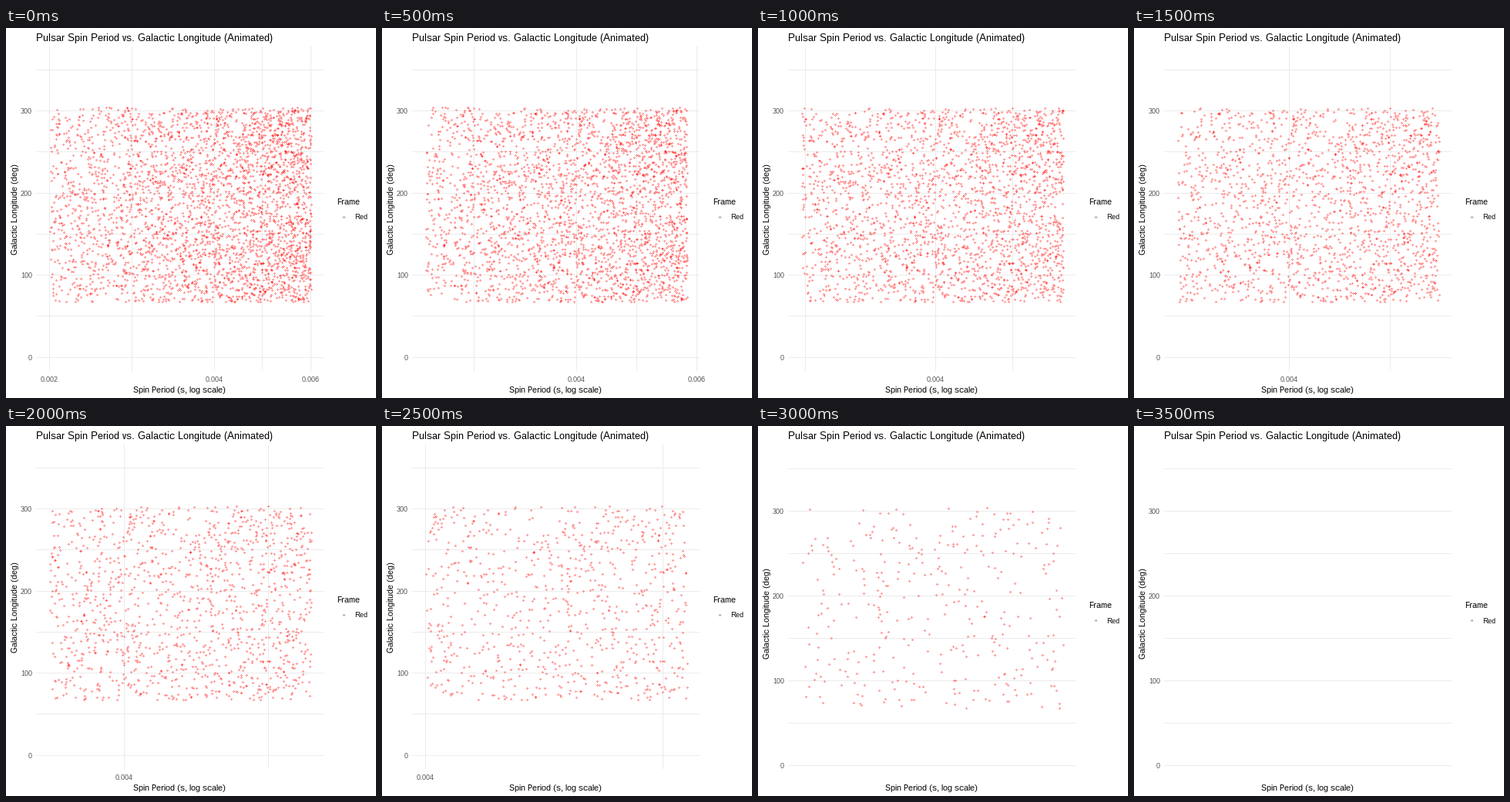
A matplotlib script that plays this animation: 480 by 480 pixels, repeating every 5000 ms.

```python
import numpy as np
import matplotlib.pyplot as plt
from matplotlib.animation import FuncAnimation

plt.rcParams.update({
    "font.family": "Liberation Sans",
    "text.hinting": "native",
    "text.hinting_factor": 1,
})

SIZE = 480
STEP_MS = 500
STEPS = 10
LEFT, RIGHT, TOP = 39, 412, 24
DATA_LEFT, DATA_RIGHT = 56.5, 395.5
GRID, TICK = "#ebebeb", "#4d4d4d"

rng = np.random.default_rng(7)
COUNT = 3400
period = rng.uniform(0.002, 0.006, COUNT)
longitude = rng.uniform(67.5, 304.5, COUNT)

fig = plt.figure(figsize=(SIZE / 72, SIZE / 72), dpi=72, facecolor="white")
ax = fig.add_axes([0, 0, 1, 1])


def label(x, y, text, size=11, color="black", **kw):
    ax.text(x, y, text, fontsize=size, color=color, **kw)


def rule(xs, ys):
    ax.plot(xs, ys, color=GRID, lw=1, snap=False, solid_capstyle="butt", zorder=1)


def pixel(v):
    return np.floor(v) + 0.5


def dots(x, y, color, alpha):
    # Each dot is a three-pixel plus with a paler centre.
    style = dict(ls="none", mew=0, zorder=2)
    x, y = pixel(x), pixel(y)
    for dx, dy in ((-1, 0), (1, 0), (0, -1), (0, 1)):
        ax.plot(x + dx, y + dy, marker="s", ms=1, mfc=(*color, alpha), **style)
    ax.plot(x, y, marker="s", ms=1, mfc=(*color, alpha * 0.4), **style)


def draw(step):
    ax.clear()
    ax.set(xlim=(0, SIZE), ylim=(SIZE, 0))
    ax.axis("off")

    # The period window narrows from both sides until it is empty.
    stage = min(step, 7)
    low, high = 0.002 + 0.0004 * stage, 0.006 - 0.0002 * stage
    has_ticks = stage < 6
    bottom = 445 if has_ticks else 460
    zero, scale = (427, 1.065) if has_ticks else (440.7, 1.1015)
    middle = (TOP + bottom) / 2

    def to_x(p):
        return DATA_LEFT + (DATA_RIGHT - DATA_LEFT) * np.log(p / low) / np.log(high / low)

    for deg in range(0, 351, 50):
        y = pixel(zero - scale * deg)
        rule([LEFT, RIGHT], [y, y])
        if deg % 100 == 0:
            label(34, y + 3.5, str(deg), 9, TICK, ha="right")

    if has_ticks:
        breaks = [0.002, 0.004, 0.006]
        minor = [np.sqrt(a * b) for a, b in zip(breaks, breaks[1:])]
        for p in breaks + minor:
            x = pixel(to_x(p))
            if LEFT < x < RIGHT:
                rule([x, x], [TOP, bottom])
                if p in breaks:
                    label(x - 0.5, 459, f"{p:.3f}", 9, TICK, ha="center")

    if low < high:
        shown = (period >= low) & (period <= high)
        dots(to_x(period[shown]), zero - scale * longitude[shown], (1, 0, 0), 0.5)

    label(39, 17, "Pulsar Spin Period vs. Galactic Longitude (Animated)", 13)
    label(225, 473, "Spin Period (s, log scale)", ha="center")
    label(17.5, middle + 0.5, "Galactic Longitude (deg)", rotation=90,
          ha="right", va="center")
    label(429, middle - 5.5, "Frame")
    label(452, middle + 13.5, "Red", 9)
    dots(np.array([437]), np.array([middle + 9.5]), (0.45, 0.45, 0.45), 0.75)


animation = FuncAnimation(fig, draw, frames=STEPS, init_func=lambda: None,
                          interval=STEP_MS, repeat=True, repeat_delay=0)
plt.show()
```
